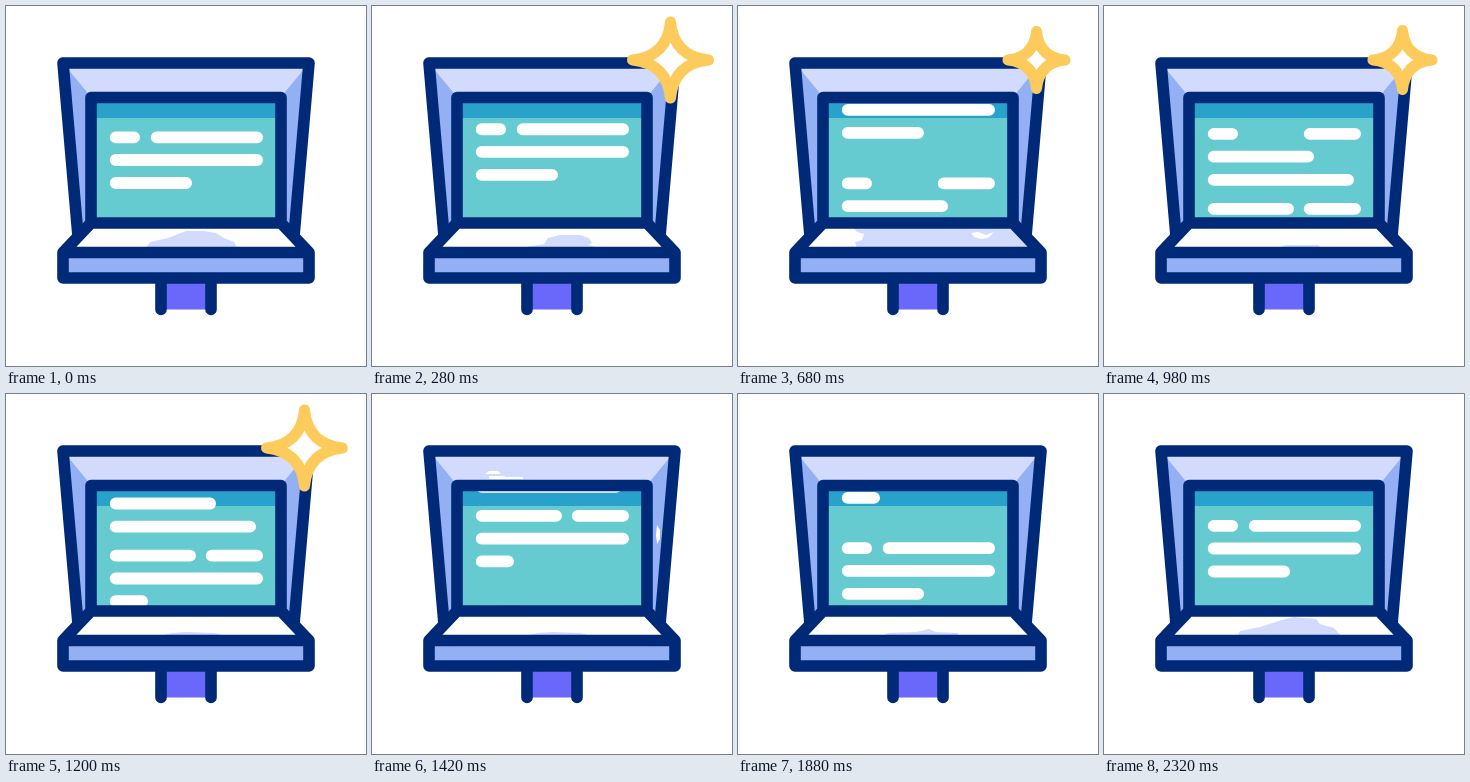
These frames come from a looping animation (360x360 px, 2.4 s). An HTML page:

```html
<!DOCTYPE html>
<html lang="en">
<head>
<meta charset="utf-8">
<title>Scrolling laptop</title>
<style>
  html, body { margin: 0; width: 100%; height: 100%; overflow: hidden; background: #fff; }
  svg { display: block; width: 100vw; height: 100vh; }
  .ink { fill: none; stroke: #002a78; stroke-width: 11.6; stroke-linecap: round; stroke-linejoin: round; }
</style>
</head>
<body>
<svg viewBox="0 0 360 360">
  <defs>
    <clipPath id="screen"><rect x="88" y="97" width="184" height="117"/></clipPath>
    <clipPath id="deck"><path d="M85 217H275L303 241H57Z"/></clipPath>
  </defs>

  <!-- lid -->
  <path d="M57 57H303L288 230H72Z" fill="#94b0f5"/>
  <path d="M57 57H303L275 91H85Z" fill="#d2dbfe"/>
  <path id="glints" d="M113 80L117 77H126L129 80ZM117 85V82H133V83H151V85ZM285 131L288 136V145L285 150L284 141Z" fill="#fff"/>
  <path class="ink" d="M72 230L57 57H303L288 230"/>

  <!-- screen -->
  <rect x="85" y="91" width="190" height="126" fill="#66cbd0"/>
  <rect x="85" y="91" width="190" height="21" fill="#28a1cb"/>
  <g clip-path="url(#screen)">
    <path id="rows" fill="none" stroke="#fff" stroke-width="11.8" stroke-linecap="round"/>
  </g>

  <!-- deck and stand -->
  <path d="M85 217H275L303 246H57Z" fill="#fff"/>
  <path id="sheen" clip-path="url(#deck)" fill="#d2dbfe" fill-rule="evenodd"/>
  <rect x="155" y="274" width="50" height="29.5" fill="#6a67fb"/>
  <path class="ink" d="M155 274V303.5M205 274V303.5"/>
  <rect x="57" y="246.5" width="246" height="25.5" fill="#94b0f5"/>
  <path class="ink" d="M85 91.5H275V217H85ZM85 217L57 246.5V272H303V246.5L275 217M57 246.5H303"/>

  <path id="star" fill="#fff" stroke="#fdcb5b" stroke-linecap="round" stroke-linejoin="round"/>
</svg>
<script>
const LOOP = 2400, CYCLE = 267;
const el = id => document.getElementById(id);

// Text rows: y, then start and end of each bar
const ROWS = [
  [131.3, 104, 134, 145, 257], [154, 104, 257], [177, 104, 186],
  [227.5, 104, 134, 200, 257], [250.3, 104, 210], [273.5, 104, 250],
  [302.5, 104, 190, 200, 257], [325.3, 104, 257], [348, 104, 142]
];

const SCROLL = [[0, 0], [280, 8], [680, 50], [980, 99.5], [1420, 180.5], [1880, 244], [2320, 266.5]];
const SPARK = [[60, 0], [270, 38], [420, 38], [820, 25], [1220, 38], [1410, 0]];

// Light reflections on the deck, each with its end time
const SHEEN = [
  [140, "M140 242L144 236L162 232L180 225H198L210 227L218 232L228 236L231 242Z"],
  [480, "M148 242L172 238L176 232L188 229H208L217 232L220 237L216 239L228 242Z"],
  [830, "M57 246L85 217H275L303 246ZM66 242L88 222H116L119 226L126 228L124 234L117 236L119 242ZM233 227L240 226L248 229L256 226L250 232L243 233L236 231Z"],
  [1200, "M174 242L182 239H214L218 242Z"],
  [1650, "M153 242L166 239L180 238L208 239L220 242Z"],
  [2100, "M144 242L150 239L178 238L191 235L198 238L220 239V242Z"],
  [LOOP, "M133 242L136 237L156 233L178 226L190 223L212 225L216 230L230 234L237 242Z"]
];

function segment(keys, t) {
  let i = 0;
  while (i < keys.length - 2 && t >= keys[i + 1][0]) i++;
  return i;
}

// Smooth curve through the keys, at rest at both ends
function spline(keys, t) {
  const i = segment(keys, t), [t0, a] = keys[i], [t1, b] = keys[i + 1];
  const slope = k => {
    if (!k || k === keys.length - 1) return 0;
    const [p, q, r] = keys.slice(k - 1, k + 2);
    const h = q[0] - p[0], g = r[0] - q[0];
    return ((q[1] - p[1]) / h * g + (r[1] - q[1]) / g * h) / (h + g);
  };
  const d = t1 - t0, u = Math.min(1, (t - t0) / d), v = 1 - u;
  return a * v * v * (1 + 2 * u) + b * u * u * (3 - 2 * u)
    + d * u * v * (slope(i) * v - slope(i + 1) * u);
}

function eased(keys, t) {
  const i = segment(keys, t), [t0, a] = keys[i], [t1, b] = keys[i + 1];
  const u = Math.max(0, Math.min(1, (t - t0) / (t1 - t0)));
  return a + (b - a) * (1 - Math.cos(Math.PI * u)) / 2;
}

function rowsPath(shift) {
  let d = "";
  for (const base of [0, CYCLE]) {
    for (const [y, ...xs] of ROWS) {
      const at = y + base - shift;
      if (at < 85 || at > 225) continue;
      for (let i = 0; i < xs.length; i += 2) d += `M${xs[i] + 5.7} ${at.toFixed(2)}H${xs[i + 1] - 5.9}`;
    }
  }
  return d;
}

function starPath(r) {
  const x = 298.5, y = 54, c = r * 0.088;
  return `M${x} ${y - r}Q${x + c} ${y - c} ${x + r} ${y}Q${x + c} ${y + c} ${x} ${y + r}`
    + `Q${x - c} ${y + c} ${x - r} ${y}Q${x - c} ${y - c} ${x} ${y - r}Z`;
}

function draw(t) {
  el("rows").setAttribute("d", rowsPath(spline(SCROLL, t)));
  el("sheen").setAttribute("d", SHEEN.find(s => t < s[0])[1]);
  el("glints").style.display = t >= 1400 && t < 1440 ? "" : "none";
  const r = eased(SPARK, t), star = el("star");
  star.style.display = r > 0.3 ? "" : "none";
  star.setAttribute("d", starPath(r));
  star.setAttribute("stroke-width", Math.min(11, r * 0.6));
}

const start = performance.now();
function tick(now) {
  draw(Math.max(0, now - start) % LOOP);
  requestAnimationFrame(tick);
}
draw(0);
requestAnimationFrame(tick);
</script>
</body>
</html>
```
